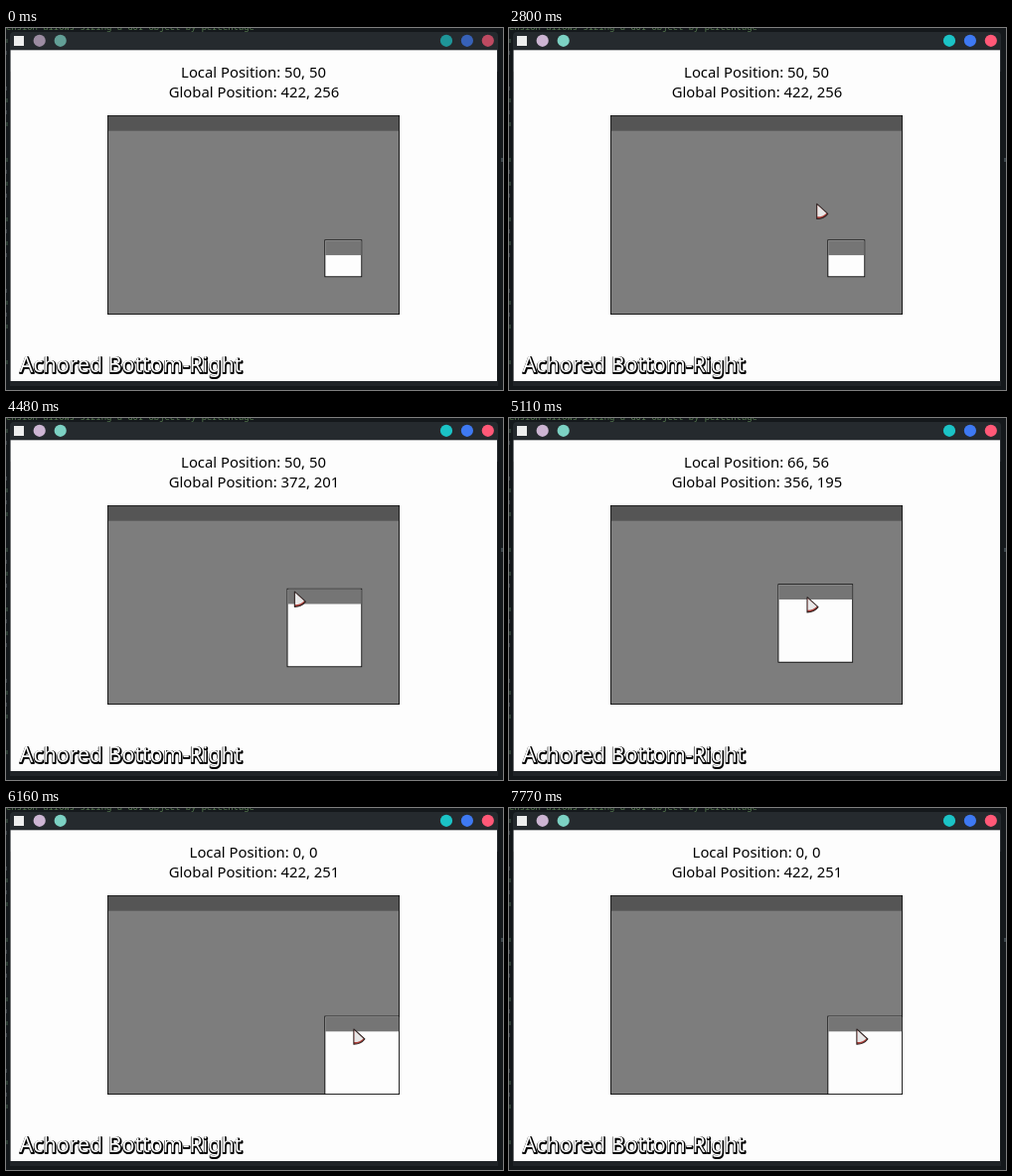
Write an HTML page with a canvas that moves like this. It is 500 px wide and 365 px high and loops after 8 s.

```html
<!DOCTYPE html>
<html lang="en">
<head>
<meta charset="utf-8">
<title>Anchored window</title>
<style>
html, body { margin: 0; width: 100%; height: 100%; overflow: hidden; background: #14181b; }
canvas { display: block; }
</style>
</head>
<body>
<canvas id="stage" width="500" height="365"></canvas>
<script>
const ctx = document.getElementById('stage').getContext('2d');
const LOOP = 8000, TICK = 70;
const SCALE = 0.756; // stage pixels per window unit
const HEADER = 15.7, LINE = 0.9;
const PANEL = { left: 102, top: 88, right: 396, bottom: 289 };

const mix = (a, b, k) => a + (b - a) * k;
const ramp = (t, from, to) => Math.min(1, Math.max(0, (t - from) / (to - from)));

function fill(color, x, y, w, h) {
  ctx.fillStyle = color;
  ctx.fillRect(x, y, w, h);
}

function paint(color, line, width) {
  ctx.fillStyle = color;
  ctx.fill();
  ctx.strokeStyle = line;
  ctx.lineWidth = width;
  ctx.stroke();
}

function disc(color, x, y, r) {
  ctx.fillStyle = color;
  ctx.beginPath();
  ctx.arc(x, y, r, 0, Math.PI * 2);
  ctx.fill();
}

function frame({ left, top, right, bottom }, headerColor, bodyColor) {
  const w = right - left, h = bottom - top;
  fill('#0c0c0c', left, top, w, h);
  fill(bodyColor, left + LINE, top + LINE, w - 2 * LINE, h - 2 * LINE);
  fill(headerColor, left + LINE, top + LINE, w - 2 * LINE, HEADER - LINE);
}

function drawDesktop() {
  fill('#14181b', 0, 0, 500, 365);
  ctx.save();
  ctx.beginPath();
  ctx.rect(0, 0, 500, 4);
  ctx.clip();
  ctx.font = '8.87px "Noto Sans Mono", monospace';
  ctx.textAlign = 'left';
  ctx.fillStyle = '#55794f';
  ctx.fillText('ension allows sizing a GUI object by percentage', 0, 2.4);
  ctx.restore();
  // slivers of the editor behind the window
  for (let row = 0; row < 28; row++) {
    const seed = (row * 37 + 11) % 17;
    if (seed > 4) fill(seed % 2 ? '#2c3b33' : '#343b40', 0, 11 + row * 12, 1 + seed % 2, 4);
  }
  fill('#3b454a', 498, 131, 2, 4);
}

function drawWindow(focus) {
  ctx.fillStyle = '#252a2e';
  ctx.beginPath();
  ctx.roundRect(4, 4, 491, 40, [4, 4, 0, 0]);
  ctx.fill();
  fill('#202428', 4, 356, 491, 5);
  fill('#fdfdfd', 4.6, 22.3, 489.4, 333.7);
  fill('#eeeeee', 8, 8, 10, 10);
  ctx.globalAlpha = mix(0.7, 1, focus);
  ['#cdb5d3', '#7cd1c3'].forEach((c, i) => disc(c, 33.7 + 21 * i, 12.8, 6.1));
  ['#1bc3c6', '#3e79f2', '#ff5877'].forEach((c, i) => disc(c, 443 + 20.9 * i, 12.8, 6.1));
  ctx.globalAlpha = 1;
}

function drawLabels(local, global) {
  ctx.font = '14.85px "Noto Sans", sans-serif';
  ctx.textAlign = 'center';
  ctx.fillStyle = '#000';
  ctx.fillText(`Local Position: ${local.join(', ')}`, 249, 50);
  ctx.fillText(`Global Position: ${global.join(', ')}`, 249.5, 70);
}

function drawCaption() {
  const text = 'Achored Bottom-Right';
  ctx.font = '21.33px "Noto Sans", sans-serif';
  ctx.textAlign = 'left';
  ctx.lineJoin = 'round';
  ctx.lineWidth = 2.2;
  ctx.strokeStyle = '#000';
  ctx.strokeText(text, 14.2, 347.5);
  ctx.fillStyle = '#fff';
  ctx.fillText(text, 13.6, 347);
}

function wedge(right, shoulder, bottom) {
  ctx.beginPath();
  ctx.moveTo(0, 0);
  ctx.lineTo(right, shoulder);
  ctx.quadraticCurveTo(right * 0.65, bottom, 0, bottom);
  ctx.closePath();
}

function drawPointer(x, y) {
  ctx.save();
  ctx.translate(x + 0.5, y);
  ctx.lineJoin = 'round';
  wedge(11, 10, 15.2);
  paint('#b0403a', '#2c2423', 1.1);
  ctx.translate(0.6, 1.2);
  wedge(9, 8.2, 11.8);
  ctx.fillStyle = '#e8e8e8';
  ctx.fill();
  ctx.restore();
}

function drawResizePointer(x, y) {
  ctx.save();
  ctx.translate(x, y);
  ctx.stroke(new Path2D());
  ctx.beginPath();
  ctx.rect(1, 1, 3, 13);
  ctx.rect(1, 1, 13, 3);
  ctx.strokeStyle = '#333';
  ctx.lineWidth = 0.8;
  ctx.stroke();
  ctx.fillStyle = '#f4f4f4';
  ctx.fill();
  ctx.beginPath();
  ctx.moveTo(6, 6.5);
  ctx.lineTo(13, 9);
  ctx.lineTo(9, 13);
  ctx.closePath();
  paint('#c23b3b', '#3a1c1c', 1);
  ctx.restore();
}

function drawCursor(t, box) {
  if (t < 1680) return;
  if (t < 3080) {
    const k = ramp(t, 1820, 3010);
    drawPointer(mix(257, box.left, k), mix(9, box.top, k));
  } else if (t < 4480) {
    drawResizePointer(box.left, box.top);
  } else {
    const k = ramp(t, 4410, 4690);
    drawPointer(box.left + 29 * k, box.top + 13.4 * k);
  }
}

// Resize from the top-left corner, nudge away, then drag into the anchor corner.
function childAt(t) {
  const nudge = ramp(t, 4760, 5110);
  return {
    x: Math.round(50 + 16 * nudge - 66 * ramp(t, 5250, 5938)),
    y: Math.round(50 + 6 * nudge - 56 * ramp(t, 5250, 5972)),
    w: Math.round(50 + 50 * ramp(t, 3150, 3945)),
    h: Math.round(50 + 55 * ramp(t, 3150, 4250))
  };
}

function draw(now) {
  const t = Math.floor((now % LOOP) / TICK) * TICK;
  const { x, y, w, h } = childAt(t);
  const box = {
    left: PANEL.right - (x + w) * SCALE,
    top: PANEL.bottom - (y + h) * SCALE,
    right: PANEL.right - x * SCALE,
    bottom: PANEL.bottom - y * SCALE
  };

  drawDesktop();
  drawWindow(ramp(t, 560, 1260));
  drawLabels([x, y], [522 - x - w, 356 - y - h]);
  frame(PANEL, '#555555', '#7d7d7d');
  frame(box, '#757575', '#fdfdfd');
  drawCaption();
  drawCursor(t, box);
}

const start = performance.now();
function loop() {
  draw(performance.now() - start);
  requestAnimationFrame(loop);
}
loop();
</script>
</body>
</html>
```
